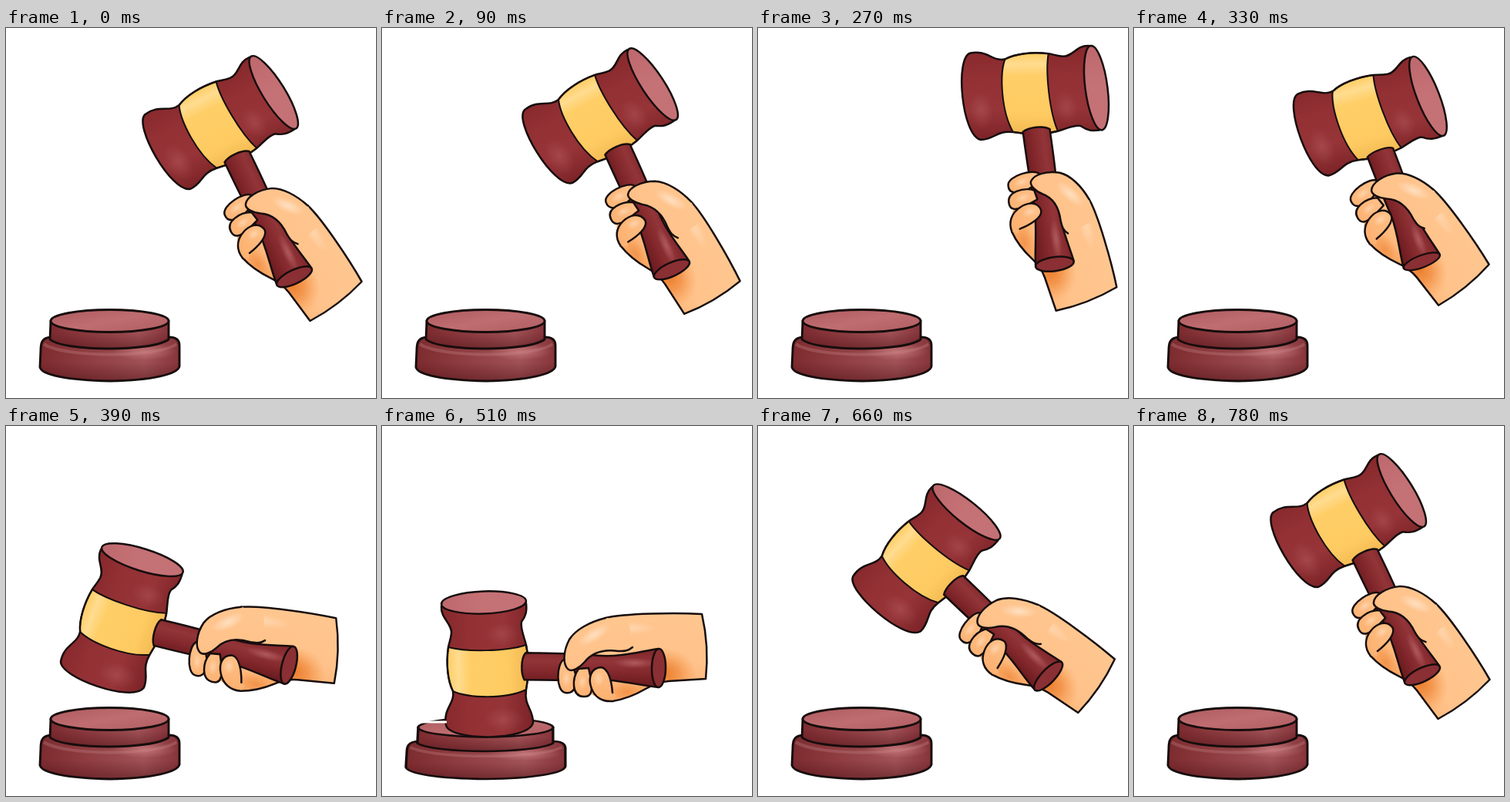
An HTML page for the animation above (1.05 s loop, 480 px wide and 480 px high).

```html
<!DOCTYPE html>
<html lang="en">
<head>
<meta charset="utf-8">
<title>Gavel</title>
<style>
html, body { margin: 0; width: 100%; height: 100%; overflow: hidden; background: #fff; }
svg { display: block; width: 100vw; height: 100vh; }
.ink { fill: none; stroke: #170d0d; stroke-width: 2.5; stroke-linecap: round; stroke-linejoin: round; }
.thin { stroke-width: 2; }
.bold { stroke-width: 2.9; }
</style>
</head>
<body>
<svg viewBox="0 0 480 480">
  <defs>
    <linearGradient id="wood" gradientUnits="userSpaceOnUse" x1="76" y1="0" x2="196" y2="0">
      <stop offset="0" stop-color="#86282b"/><stop offset=".3" stop-color="#923034"/>
      <stop offset=".68" stop-color="#963438"/><stop offset="1" stop-color="#7c2327"/>
    </linearGradient>
    <linearGradient id="gold" gradientUnits="userSpaceOnUse" x1="85" y1="0" x2="190" y2="0">
      <stop offset="0" stop-color="#ffcd63"/><stop offset=".13" stop-color="#ffdc90"/>
      <stop offset=".28" stop-color="#ffce67"/><stop offset=".75" stop-color="#fecb62"/>
      <stop offset="1" stop-color="#f3b952"/>
    </linearGradient>
    <linearGradient id="face" x1="0" y1="0" x2="1" y2="0">
      <stop offset="0" stop-color="#bd686d"/><stop offset=".5" stop-color="#c57276"/>
      <stop offset="1" stop-color="#c47175"/>
    </linearGradient>
    <linearGradient id="grip" x1="0" y1="0" x2="0" y2="1">
      <stop offset="0" stop-color="#7c2327"/><stop offset=".35" stop-color="#923539"/>
      <stop offset=".65" stop-color="#82272b"/><stop offset="1" stop-color="#66191d"/>
    </linearGradient>
    <linearGradient id="skin" gradientUnits="userSpaceOnUse" x1="0" y1="245" x2="0" y2="358">
      <stop offset="0" stop-color="#ffc68f"/><stop offset=".55" stop-color="#ffc28a"/>
      <stop offset="1" stop-color="#fcb06f"/>
    </linearGradient>
    <linearGradient id="tier" x1="0" y1="0" x2="1" y2="0">
      <stop offset="0" stop-color="#7c2b2f"/><stop offset=".3" stop-color="#8d3b3f"/>
      <stop offset=".75" stop-color="#a05256"/><stop offset="1" stop-color="#86343a"/>
    </linearGradient>
    <linearGradient id="dusk" x1="0" y1="0" x2="0" y2="1">
      <stop offset=".4" stop-color="#4d1116" stop-opacity="0"/><stop offset="1" stop-color="#4d1116" stop-opacity=".5"/>
    </linearGradient>
    <linearGradient id="plate" x1="0" y1="0" x2="1" y2="1">
      <stop offset="0" stop-color="#ad5a5f"/><stop offset=".5" stop-color="#bf6d70"/>
      <stop offset="1" stop-color="#b05d61"/>
    </linearGradient>
    <radialGradient id="warm"><stop offset="0" stop-color="#ea7d2c"/><stop offset=".45" stop-color="#f08b3e" stop-opacity=".75"/><stop offset="1" stop-color="#f59a4f" stop-opacity="0"/></radialGradient>
    <radialGradient id="shine"><stop offset="0" stop-color="#fff0e0" stop-opacity=".9"/><stop offset="1" stop-color="#fff0e0" stop-opacity="0"/></radialGradient>
    <radialGradient id="glow"><stop offset="0" stop-color="#cf8184" stop-opacity=".7"/><stop offset="1" stop-color="#cf8184" stop-opacity="0"/></radialGradient>
    <path id="palmShape" d="M415 244 C380 242 314 243 290 249 C270 255 250 275 243 300 L243 330 L275 350 L300 357 C318 354 330 348 342 341 C352 335 360 332 372 331 L420 328 C423 300 421 270 415 244Z"/>
    <clipPath id="palmClip"><use href="#palmShape"/></clipPath>
  </defs>

  <g id="base">
    <path d="M58 401 C47 402 45 408 45 418 L44 440 C46 450 80 457 135 458 C190 457 223 449 225 439 L225 412 C225 404 220 401 211 401Z" fill="url(#tier)"/>
    <path d="M46 420 C70 434 200 434 225 417 L225 439 C223 449 190 457 135 458 C80 457 46 450 44 440Z" fill="url(#dusk)"/>
    <path d="M49 410 C76 428 196 428 221 410" fill="none" stroke="#c58a8c" stroke-width="4" opacity=".3"/>
    <ellipse cx="180" cy="420" rx="42" ry="11" fill="url(#glow)"/>
    <path class="ink bold" d="M58 401 C47 402 45 408 45 418 L44 440 C46 450 80 457 135 458 C190 457 223 449 225 439 L225 412 C225 404 220 401 211 401"/>
    <path d="M58 380 L57 404 C76 420 190 420 211 404 L211 380Z" fill="url(#tier)"/>
    <path d="M58 380 L57 404 C76 420 190 420 211 404 L211 380Z" fill="url(#dusk)"/>
    <path class="ink bold" d="M58 380 L57 404 C76 420 190 420 211 404 L211 380"/>
    <ellipse class="ink bold" cx="134.500" cy="380" rx="76.500" ry="14.500" style="fill:url(#plate)"/>
  </g>

  <g id="head"><g transform="translate(-135.500 -308.300)">
    <path d="M77 234 C76 250 91 256 90 269 C89 278 87 281 86 287 C83 308 85 330 92 344 C95 360 79 366 83 388 C88 409 190 409 196 385 C196 366 184 364 187 342 C191 322 191 302 187 284 C184 272 179 262 181 254 C187 246 188 240 187 230Z" fill="url(#wood)"/>
    <ellipse cx="156" cy="270" rx="22" ry="15" fill="url(#glow)" opacity=".3"/>
    <ellipse cx="158" cy="381" rx="26" ry="16" fill="url(#glow)" opacity=".35"/>
    <path class="ink thin" d="M86 287 C108 293 160 293 187 284 C191 302 191 322 187 342 C160 355 112 353 92 344 C85 330 83 308 86 287Z" style="fill:url(#gold)"/>
    <path class="ink" d="M77 234 C76 250 91 256 90 269 C89 278 87 281 86 287 C83 308 85 330 92 344 C95 360 79 366 83 388 C88 409 190 409 196 385 C196 366 184 364 187 342 C191 322 191 302 187 284 C184 272 179 262 181 254 C187 246 188 240 187 230"/>
    <ellipse class="ink" cx="132" cy="229" rx="55" ry="14.500" transform="rotate(-2 132 229)" style="fill:url(#face)"/>
  </g></g>

  <g id="palm"><g transform="translate(-417.500 -286)">
    <use href="#palmShape" fill="url(#skin)"/>
    <g clip-path="url(#palmClip)">
      <ellipse cx="366" cy="322" rx="42" ry="34" fill="url(#warm)"/>
      <ellipse cx="318" cy="345" rx="30" ry="16" fill="url(#warm)" opacity=".6"/>
      <ellipse cx="316" cy="262" rx="40" ry="9" fill="url(#shine)" opacity=".5"/>
    </g>
    <path class="ink" d="M290 249 C314 243 380 242 415 244 C421 270 423 300 420 328 L372 331 C360 332 352 335 342 341 C330 348 318 354 299 357"/>
  </g></g>

  <g id="handle">
    <path class="ink" d="M2 -17 C30 -17 60 -18 95 -15 C125 -13 150 -21 174 -25 L175 25 C150 23 125 16 95 16 C60 18 30 18 1 18 C-4 10 -4 -10 2 -17Z" style="fill:url(#grip)"/>
    <ellipse cx="143" cy="-6" rx="26" ry="7" fill="url(#glow)" opacity=".7"/>
    <ellipse class="ink" cx="175" cy="0" rx="9" ry="25" style="fill:#8a2f33"/>
  </g>

  <g id="fingers"><g transform="translate(-417.500 -286)">
    <path class="ink" d="M236 303 C226 308 225 344 238 346 C249 348 253 338 251 322 L246 303Z" style="fill:url(#skin)"/>
    <path class="ink" d="M255 315 C246 328 246 350 261 351 C271 352 274 345 271 328 L268 314Z" style="fill:url(#skin)"/>
    <path d="M284 313 C270 314 268 328 271 338 C275 352 286 358 299 357 L304 350 L299 346 C298 332 294 314 284 313Z" fill="url(#skin)"/>
    <path class="ink" d="M299 346 C298 332 294 314 284 313 C270 314 268 328 271 338 C275 352 286 358 299 357"/>
    <ellipse cx="239" cy="328" rx="6" ry="11" fill="url(#shine)" opacity=".5"/>
    <ellipse cx="260" cy="332" rx="6" ry="10" fill="url(#shine)" opacity=".5"/>
    <ellipse cx="281" cy="328" rx="7" ry="10" fill="url(#shine)" opacity=".5"/>
    <path d="M325 287 C318 293 312 292 306 292 C284 289 271 296 263 306 C256 314 247 319 242 316 C234 310 235 292 243 277 C251 264 270 254 290 249 L320 252Z" fill="url(#skin)"/>
    <ellipse cx="275" cy="271" rx="24" ry="9" transform="rotate(-32 275 271)" fill="url(#shine)" opacity=".7"/>
    <path class="ink" d="M325 287 C318 293 312 292 306 292 C284 289 271 296 263 306 C256 314 247 319 242 316 C234 310 235 292 243 277 C251 264 270 254 290 249"/>
  </g></g>

  <g fill="#fff">
    <rect id="dashL" x="48" y="382.500" width="36" height="3"/>
    <rect id="dashR" x="175" y="382.500" width="52" height="3"/>
  </g>
</svg>
<script>
const LOOP = 1050, STEP = 30, RAD = Math.PI / 180;
const el = id => document.getElementById(id);
const rest = [278, 122, 60.3, 63.5, 428, 354.5, 57, 56];

// time, then x, y, x-axis angle, y-axis angle for the head and for the hand
const keys = [
  [0, ...rest],
  [150, 290.5, 102.5, 58, 61.1, 428.5, 347, 65, 68],
  [210, 325, 84, 70, 74, 427, 348, 70, 70],
  [270, 360, 83, 84.8, 88.7, 426, 351.5, 75, 72],
  [300, 368, 84, 90, 94, 427, 350, 76, 73],
  [345, 263, 138, 57, 60, 428, 322, 42, 41],
  [390, 150.5, 248.3, 19.4, 22, 427, 291.5, 9, 5],
  [450, 134, 307, -1, -1, 417, 286, 0, 0],
  [510, 135.5, 308.3, 0, 0, 417.5, 286, 0, 0],
  [540, 143, 291, 6, 6, 424, 296, 6, 6],
  [600, 182, 215.8, 25.5, 27.8, 441.5, 325, 25, 25],
  [690, 235, 155, 47, 50, 437, 342, 43, 43],
  [780, ...rest]
];
const squash = { 450: .7, 480: 1.05, 510: 1, 540: .05 };

// Monotone cubic interpolation of one column
const rise = (i, c) => (keys[i + 1][c] - keys[i][c]) / (keys[i + 1][0] - keys[i][0]);
function slope(i, c) {
  if (i === 0 || i === keys.length - 1) return 0;
  const p = rise(i - 1, c), q = rise(i, c);
  return p * q > 0 ? 2 * p * q / (p + q) : 0;
}
function value(t, c) {
  const last = keys.length - 1;
  if (t >= keys[last][0]) return keys[last][c];
  let i = 0;
  while (t >= keys[i + 1][0]) i++;
  const a = keys[i], b = keys[i + 1], d = b[0] - a[0], u = (t - a[0]) / d;
  const u2 = u * u, u3 = u2 * u;
  return a[c] * (2 * u3 - 3 * u2 + 1) + b[c] * (3 * u2 - 2 * u3)
    + d * (slope(i, c) * (u3 - 2 * u2 + u) + slope(i + 1, c) * (u3 - u2));
}

const frame = (x, y, ax, ay, sx = 1) => [
  sx * Math.cos(ax * RAD), sx * Math.sin(ax * RAD), -Math.sin(ay * RAD), Math.cos(ay * RAD), x, y
];
const place = (m, x, y) => [m[0] * x + m[2] * y + m[4], m[1] * x + m[3] * y + m[5]];
const move = (id, m) => el(id).setAttribute("transform", `matrix(${m.map(n => n.toFixed(4)).join(" ")})`);
const show = (id, on) => el(id).setAttribute("visibility", on ? "visible" : "hidden");

function draw(t) {
  const [hx, hy, ha, hb, px, py, pa, pb] = rest.map((_, i) => value(t, i + 1));
  const head = frame(hx, hy, ha, hb);
  const hand = frame(px, py, pa, pb, 1 - .0006 * pa);  // shorter when raised
  move("head", head);
  move("palm", hand);
  move("fingers", hand);

  // The handle joins the head to the fist
  const [x0, y0] = place(head, 48.5, 3), [x1, y1] = place(hand, -58.5, 28);
  const dx = x1 - x0, dy = y1 - y0, len = Math.hypot(dx, dy);
  move("handle", [dx / 175, dy / 175, -dy / len, dx / len, x0, y0]);

  const k = squash[t] || 0, sx = 1 + .143 * k, sy = 1 - .14 * k;
  move("base", [sx, 0, 0, sy, 135 * (1 - sx), 458 * (1 - sy)]);

  show("dashL", t >= 480 && t <= 510);
  show("dashR", t >= 570 && t <= 630);
  el("dashR").setAttribute("x", 175 + (t - 600) * .6);
}

function tick() {
  draw(Math.floor(performance.now() % LOOP / STEP) * STEP);
  requestAnimationFrame(tick);
}
tick();
</script>
</body>
</html>
```
